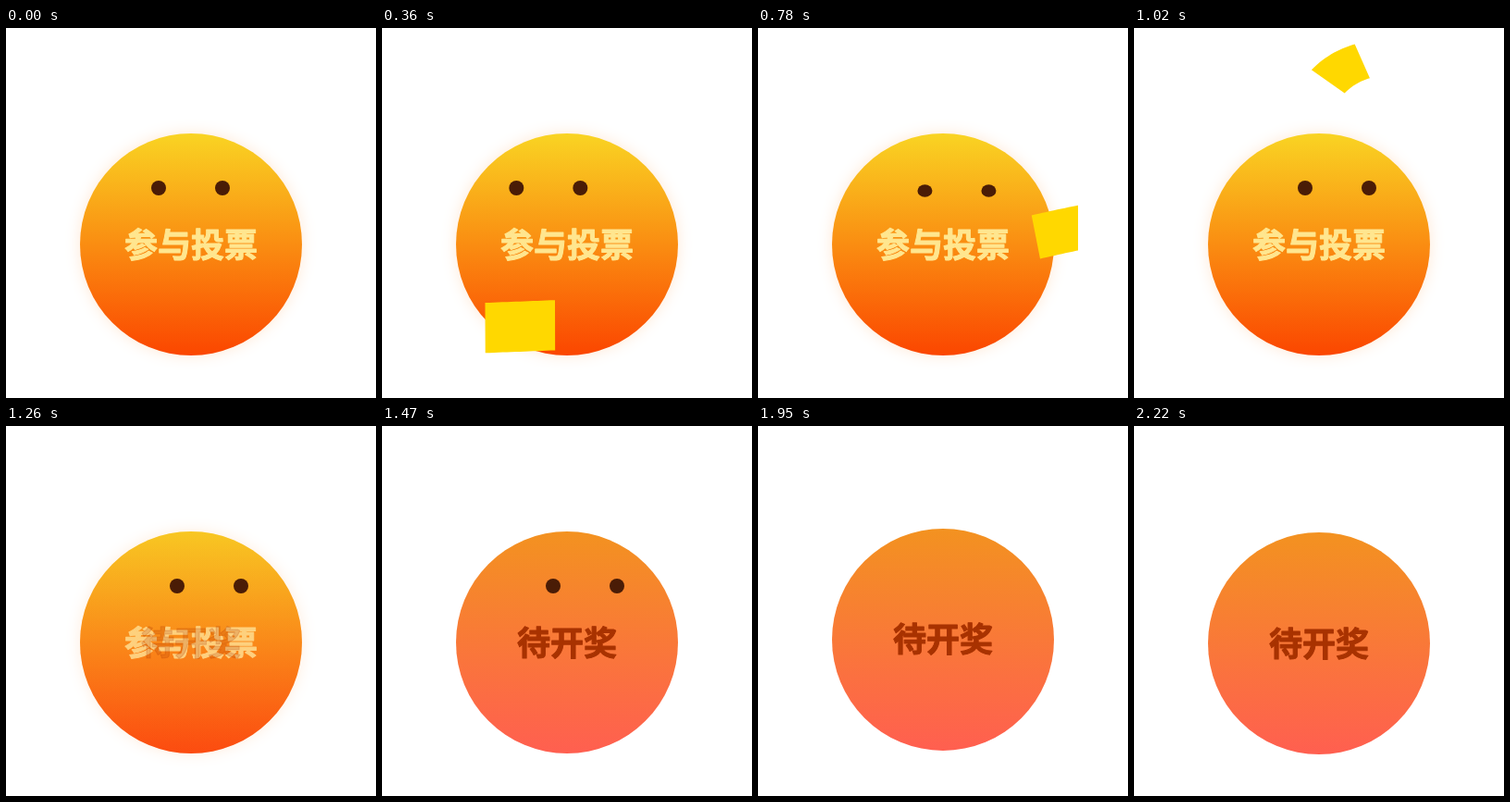
These frames come from a looping animation (400x400 px, 8000 ms). An HTML page with a canvas:

```html
<!DOCTYPE html>
<html lang="zh-CN">
<head>
<meta charset="utf-8">
<style>
  html, body { margin: 0; width: 100%; height: 100%; overflow: hidden; background: #fff; }
  canvas { display: block; width: 400px; height: 400px; }
</style>
</head>
<body>
<canvas id="stage"></canvas>
<script>
const LOOP = 8000, STEP = 30, REST = 2220;
const THROW = 780, APEX = 1020, SWALLOWED = 1200;
const DROP = 1500, IMPACT = 1620;
const BALL = { x: 200, y: 234, r: 120 };
const FONT = '900 36px "Noto Sans CJK SC", "Noto Sans CJK", "Noto Sans SC", sans-serif';

const VOTE = { top: '#f9d423', bottom: '#fb4600', ink: '#ffe68f', text: '参与投票' };
const WAIT = { top: '#f39220', bottom: '#ff5f50', ink: '#a83200', text: '待开奖' };

// Paper paths: start, control and end of a quadratic curve.
const SLIDE_IN = [[-46, 330], [185, 363], [332, 219]];
const TOSS = [[332, 219], [204.5, -101], [200, 165]];

const canvas = document.getElementById('stage');
const c = canvas.getContext('2d');
const scale = window.devicePixelRatio || 1;
canvas.width = canvas.height = 400 * scale;

const progress = (t, from, to) => Math.min(1, Math.max(0, (t - from) / (to - from)));
const ease = u => u * u * (3 - 2 * u);
const curve = ([a, b, d], u) =>
  [0, 1].map(k => (1 - u) ** 2 * a[k] + 2 * u * (1 - u) * b[k] + u * u * d[k]);

function ballOffset(t) {
  if (t < IMPACT) return 26 * progress(t, DROP, IMPACT) ** 2;
  const s = Math.min(t, REST) - IMPACT;
  return 1 + 25 * Math.exp(-s / 200) * Math.cos(2 * Math.PI * s / 800);
}

// A sheet bent into a ring sector, turning and shrinking as it flies.
function drawPaper(t) {
  if (t > SWALLOWED) return;
  const [x, y] = t < THROW
    ? curve(SLIDE_IN, t / THROW)
    : curve(TOSS, progress(t, THROW, SWALLOWED));
  const v = t / APEX;
  const late = Math.min(1, v ** 12);
  const w = 76 - 33 * v ** 4, h = 56 - 14 * v ** 2;
  const half = 0.001 + 0.27 * late;
  const r = w / 2 / half;

  c.save();
  c.beginPath();
  c.rect(0, 0, 346, 400);
  c.clip();
  c.translate(x, y);
  c.rotate(-0.7 * v ** 5);
  c.transform(1, -0.035 + 0.2 * late, 0, 1, 0, 0);
  c.beginPath();
  for (const side of [1, -1]) {
    for (let i = -8; i <= 8; i++) {
      const a = side * half * i / 8, radius = r + side * h / 2;
      c.lineTo(radius * Math.sin(a), r - radius * Math.cos(a));
    }
  }
  c.closePath();
  c.fillStyle = '#ffd800';
  c.fill();
  c.restore();
}

function drawFace(look, y, alpha, glow) {
  const fill = c.createLinearGradient(0, y - BALL.r, 0, y + BALL.r);
  fill.addColorStop(0, look.top);
  fill.addColorStop(1, look.bottom);
  c.save();
  c.globalAlpha = alpha;
  c.beginPath();
  c.arc(BALL.x, y, BALL.r, 0, 7);
  c.shadowColor = `rgba(255, 150, 60, ${0.22 * glow})`;
  c.shadowBlur = 16 * scale;
  c.fillStyle = fill;
  c.fill();
  c.shadowColor = 'transparent';
  c.font = FONT;
  c.textAlign = 'center';
  c.lineJoin = 'round';
  c.lineWidth = 1;
  c.fillStyle = c.strokeStyle = look.ink;
  c.fillText(look.text, BALL.x, y + 13.5);
  c.strokeText(look.text, BALL.x, y + 13.5);
  c.restore();
}

function drawEyes(t, y) {
  const dx = -20 * ease(progress(t, 0, 240)) + 40 * ease(progress(t, 330, 900));
  const squint = Math.sin(Math.PI * progress(t, 690, 870));
  const ry = (8 - 1.2 * squint) * (1 - ease(progress(t, DROP, 1590)));
  c.fillStyle = '#4a1c06';
  for (const x of [165, 234]) {
    c.beginPath();
    c.ellipse(x + dx, y - 61 + 3 * squint, 8, ry, 0, 0, 7);
    c.fill();
  }
}

function drawBall(t) {
  const fade = ease(progress(t, SWALLOWED, 1410));
  const y = BALL.y + ballOffset(t);
  if (fade < 1) drawFace(VOTE, y, 1, 1 - fade);
  if (fade > 0) drawFace(WAIT, y, fade, 0);
  drawEyes(t, y);
}

function draw(t) {
  c.setTransform(scale, 0, 0, scale, 0, 0);
  c.fillStyle = '#fff';
  c.fillRect(0, 0, 400, 400);
  const layers = t < 960 ? [drawBall, drawPaper] : [drawPaper, drawBall];
  layers.forEach(layer => layer(t));
}

const start = performance.now();
function tick() {
  const t = (performance.now() - start) % LOOP;
  draw(Math.floor(t / STEP) * STEP);
  requestAnimationFrame(tick);
}
tick();
</script>
</body>
</html>
```
